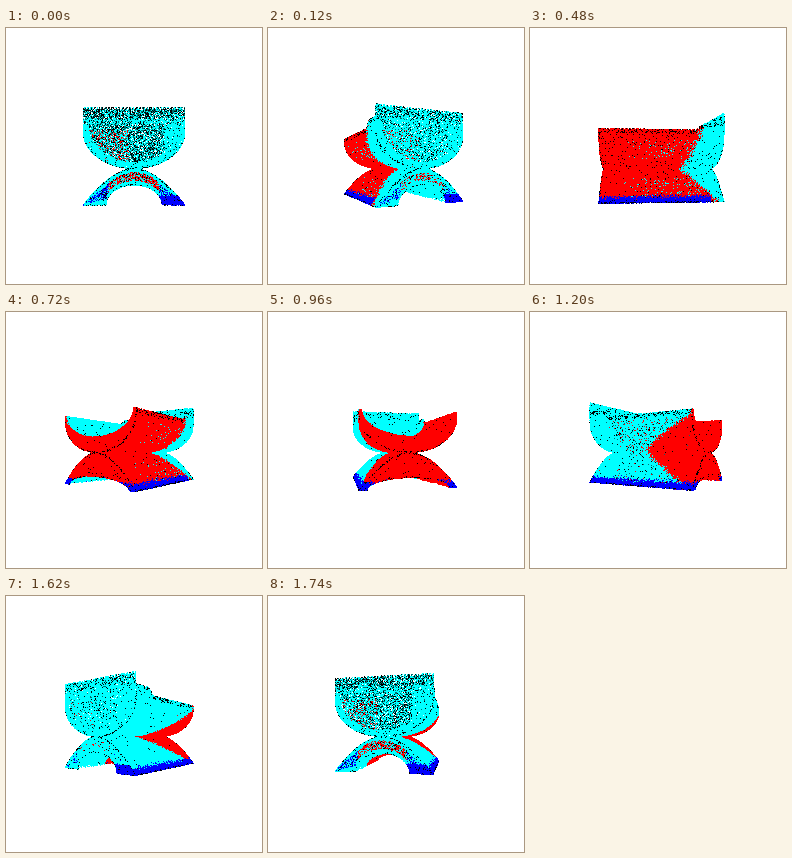
Animation of 256 by 256 pixels, one loop 1800 ms. Source, as a matplotlib script:

```python
import numpy as np
import matplotlib.pyplot as plt
from matplotlib.animation import FuncAnimation

SIZE, FRAMES, STEP = 256, 30, 60
A, B, LOW, TOP, CAM = 40.0, 53.0, 28.8, 48.0, 250.0
CX, CY = 127.6, 140
WHITE, BLACK, RED, CYAN, BLUE, TEAL = range(6)
PALETTE = np.array([[255, 255, 255], [0, 0, 0], [255, 0, 0],
                    [0, 255, 255], [0, 0, 255], [0, 110, 110]], np.uint8)

rng = np.random.default_rng(4)
parts = []


def uni(lo, hi, n):
    return rng.uniform(lo, hi, n)


def add(x, y, z, color, black, head=0.0, phi=0.0, tint=BLACK):
    """Store points; head is the chance of tint when seen from angle phi."""
    cols = [np.broadcast_to(v, len(x)).astype(float)
            for v in (x, y, z, color, black, head, phi, tint)]
    parts.append(np.array(cols))


def bowl(x, half, base, rise):
    return base + rise * (1 - np.sqrt(np.clip(1 - (x / half) ** 2, 0, 1)))


def arch(x):
    return -LOW * np.abs(x / A) ** 1.8


def opening(x, y):
    """Underside that widens away from the camera end."""
    k = (CAM - y) / (CAM - B)
    half, apex = 22 * k, 13 * k
    return -bowl(x, half, apex, LOW - apex)


def rim(y):
    return 33 + 6 * np.clip((y - 28) / 8, 0, 1)


def side_color(x, y, z):
    """Red or cyan by the slanted borders on both flanks."""
    n = len(x)
    t = np.abs(z) / LOW
    yj = y + rng.normal(0, 2.0, n)
    left = yj > 20 + np.where(z > 0, 12, 28) * t
    right = yj > 8 - 60 * t
    c = np.where(np.where(x < 0, left, right), CYAN, RED)
    r = rng.random(n)
    mid = (t > 0.3) & (t < 0.85) & (np.abs(y) < 38)
    sparse = (x < 0) & mid & (c == RED) & (r < 0.14 * (y + 38) / 76)
    return np.where(sparse, CYAN, c)


def edge_black(y, p=0.01):
    return np.where(np.abs(y) > B - 0.6, 0.35, p)


def flank_grain(x, y, c):
    """Speckle that shows when a flank faces the camera."""
    n = len(x)
    head = np.where((x > 0) & (c == CYAN) & (y < 28), 0.4, 0.03)
    tint = rng.choice([BLACK, TEAL, RED], n, p=[0.35, 0.35, 0.3])
    tint[x < 0] = BLACK
    return head, np.where(x > 0, 1.5, 0.5) * np.pi, tint


def upper_shell(n=110000):
    u, y = uni(-np.pi / 2, np.pi / 2, n), uni(-B, B, n)
    x, z = A * np.sin(u), LOW * (1 - np.cos(u))
    c = side_color(x, y, z)
    add(x, y, z, c, edge_black(y), *flank_grain(x, y, c))
    inner = np.where((x > 0) | (y > 25), CYAN, RED)
    add(0.95 * x, y, 13 + 20 * (1 - np.cos(u)), inner, 0.03)


def side_walls(n=36000):
    y, v = uni(-B, B, n), rng.random(n)
    x = np.where(rng.random(n) < 0.5, -A, A)
    h = rim(y)
    z = LOW + (h - LOW) * v
    keep = ~((h - z < 1.6) & (np.sin(y * 2.1) > 0))
    c = side_color(x, y, np.full(n, LOW))
    black = np.where(h - z < 3.5, 0.3, edge_black(y, 0.04))
    add(x[keep], y[keep], z[keep], c[keep], black[keep])


def end_wall(n=70000):
    x, v = uni(-A, A, n), rng.random(n)
    base = bowl(x, A, 0, LOW)
    z = base + (TOP - base) * v
    inside = z > bowl(x, 36, 5, 30)
    band = (z > 35) & (z < 39)
    plain = (x > 24) & (z < 35) & (z > 13)
    head = np.where(inside, 0.55, 0.03)
    head[band] = 0.3
    head[plain] = 0.08
    tint = rng.choice([BLACK, TEAL, WHITE], n, p=[0.4, 0.4, 0.2])
    tint[(x < -4) & (z < 30) & (rng.random(n) < 0.3)] = RED
    black = np.where(z > 40, 0.12, 0.02)
    black[z - base < 0.6] = 0.35
    keep = ~((z > TOP - 1.4) & (np.sin(x * 2.3) > 0))
    add(x[keep], B, z[keep], CYAN, black[keep], head[keep], 0, tint[keep])


def open_end(n=26000):
    x, v = uni(-A, A, n), rng.random(n)
    lo, hi = bowl(x, A, 0, LOW), bowl(x, 0.95 * A, 13, 20)
    add(x, -B, lo + (hi - lo) * v, RED, np.where(v < 0.06, 0.35, 0.01))


def lower_shell(n=110000):
    x, y = uni(-A, A, n), uni(-B, B, n)
    z = arch(x)
    c = side_color(x, y, z)
    low = (z < -24 + rng.normal(0, 1.0, n)) & ((x > 0) | (y < 42))
    c = np.where(low, BLUE, c)
    black = np.where(z < -LOW + 0.6, 0.4, edge_black(y))
    head, phi, tint = flank_grain(x, y, c)
    add(x, y, z, c, black, 0.5 * head, phi, tint)


def underside(n=60000):
    x, y = uni(-A, A, n), uni(-B, B, n)
    z = opening(x, y)
    keep = z > -LOW + 0.01
    x, y, z = x[keep], y[keep], z[keep]
    add(x, y, z, np.where((x > 0) | (y > 15), CYAN, RED), 0.02)


def lower_end(y, n=30000):
    x, v = uni(-A, A, n), rng.random(n)
    hi, lo = arch(x), opening(x, y)
    z = hi + (lo - hi) * v
    black = np.where((v < 0.05) | (v > 0.96), 0.35, 0.02)
    if y < 0:
        c = np.where(z < -23 + rng.normal(0, 1, n), BLUE, RED)
        add(x, y, z, c, black)
        return
    mid = (v > 0.22) & (v < 0.75)
    c = np.where((x > 19) & (z < -21.5), BLUE, CYAN)
    tint = np.where(np.abs(x) < 20, RED, BLUE)
    tint[rng.random(n) < 0.2] = BLACK
    add(x, y, z, c, black, np.where(mid, 0.65, 0), 0, tint)


upper_shell()
side_walls()
end_wall()
open_end()
lower_shell()
underside()
lower_end(B)
lower_end(-B)

X, Y, Z, COLOR, DARK, HEAD, PHI, TINT = np.concatenate(parts, axis=1)
COLOR, TINT = COLOR.astype(int), TINT.astype(int)
NOISE = rng.random(len(X))


def render(i):
    a = 2 * np.pi * i / FRAMES
    depth = Y * np.cos(a) - X * np.sin(a)
    s = CAM / (CAM - depth)
    px = np.rint(CX + (X * np.cos(a) + Y * np.sin(a)) * s).astype(int)
    py = np.rint(CY - Z * s).astype(int)
    grain = DARK + HEAD * np.clip(np.cos(a - PHI), 0, 1) ** 8
    c = np.where(NOISE < grain, TINT, COLOR)
    c = np.where(NOISE < DARK, BLACK, c)
    order = np.argsort(depth)
    img = np.zeros((SIZE, SIZE), int)
    img[py[order], px[order]] = c[order]
    return PALETTE[img]


fig = plt.figure(figsize=(SIZE / 100, SIZE / 100), dpi=100, facecolor="white")
ax = fig.add_axes([0, 0, 1, 1])
ax.axis("off")
view = ax.imshow(render(0), interpolation="nearest", aspect="auto")


def draw(i):
    view.set_data(render(i))
    return [view]


anim = FuncAnimation(fig, draw, frames=FRAMES, interval=STEP,
                     repeat=True, repeat_delay=0)
plt.show()
```
